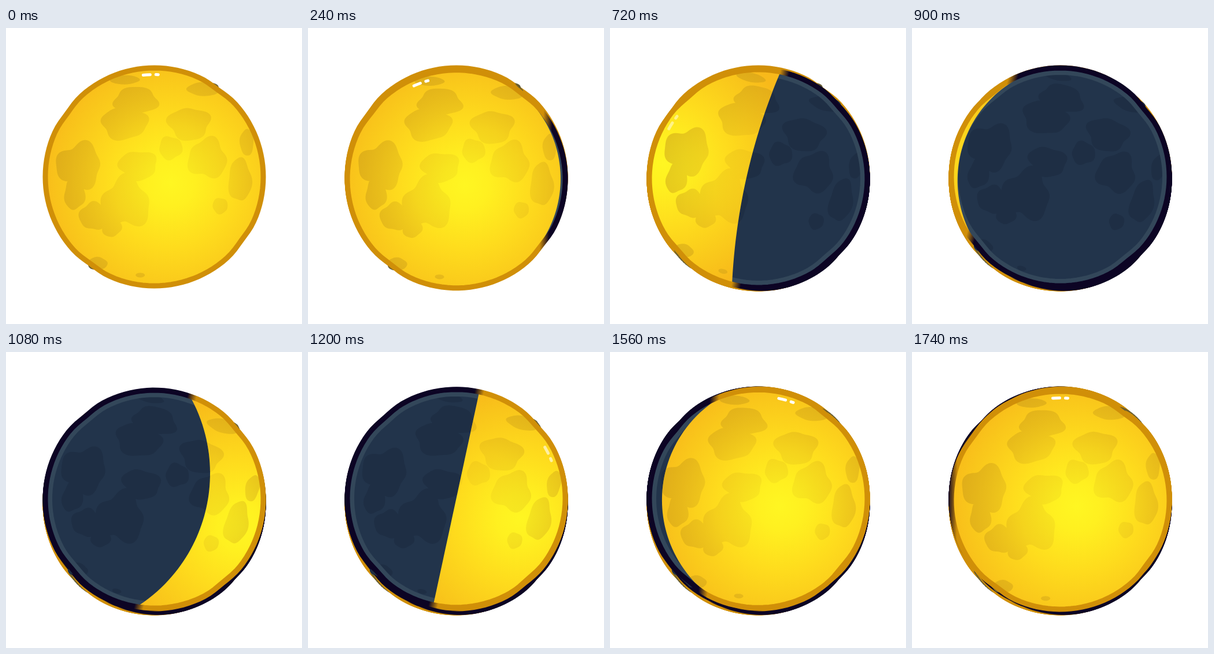
Recreate the animation shown at these times as an HTML page with a canvas. Size 512 by 512 pixels, loop 1.8 s.

```html
<!DOCTYPE html>
<html>
<head>
<meta charset="utf-8">
<title>Moon phases</title>
<style>
html, body { margin: 0; width: 100%; height: 100%; overflow: hidden; background: #fff; }
canvas { display: block; width: 512px; height: 512px; }
</style>
</head>
<body>
<canvas id="moon" width="512" height="512"></canvas>
<script>
const ctx = document.getElementById('moon').getContext('2d');
const LOOP = 1800, STEP = 60, CX = 256.5, CY = 257.5, R = 185, EDGE = 195;
const TAU = Math.PI * 2, rad = d => d * Math.PI / 180;
const clamp = (v, lo, hi) => Math.min(hi, Math.max(lo, v));

// Adds a closed ring whose radius varies with the angle
function ring(path, x, y, rx, ry, shape) {
  for (let d = 0; d < 360; d += 3) {
    const a = rad(d), q = shape(a);
    const point = [x + rx * q * Math.cos(a), y + ry * q * Math.sin(a)];
    d ? path.lineTo(...point) : path.moveTo(...point);
  }
  path.closePath();
  return path;
}

// Four shallow dents around the outline
const dented = a => 1 - .011 * Math.max(0, Math.cos(4 * (a - rad(36)))) ** 8;
const disc = r => ring(new Path2D(), 0, 0, r, r, dented);
const body = disc(R), rim = disc(188.5), shine = disc(180.5);

// Lobes of the seas and craters: x, y, half width, half height
const lobes = [
  [-32, -132, 38, 23], [-52, -92, 40, 27], [-130, -20, 38, 38], [-138, 30, 18, 27],
  [60, -92, 36, 28], [92, -32, 33, 34], [28, -50, 20, 20], [160, -60, 12, 23],
  [148, 5, 20, 37], [114, 50, 13, 14], [-106, 68, 23, 24], [-74, 86, 17, 18],
  [-28, -20, 33, 25], [-50, 45, 42, 42], [-52, -168, 26, 8], [85, -152, 28, 12],
  [-98, 150, 17, 11], [-24, 170, 8, 4]
];
const spots = new Path2D();
lobes.forEach(([x, y, rx, ry], i) => {
  const wobble = Math.min(rx, ry) / 300;
  ring(spots, x, y, rx, ry, a =>
    1 + wobble * (Math.sin(3 * a + i * 2.4) + .7 * Math.sin(5 * a + i * 4.1)));
});

function radial(x, y, r, stops) {
  const paint = ctx.createRadialGradient(x, y, 0, x, y, r);
  for (const at in stops) paint.addColorStop(+at, stops[at]);
  return paint;
}

// Position of the shadow edge: apex on the axis, chord at the poles
function phase(t) {
  const waning = t < 940;
  const raw = waning
    ? EDGE - 372 * (t / 900) ** 2.45
    : -EDGE + EDGE * ((LOOP - t) / 600) ** 2.1;
  const apex = clamp(raw, -EDGE, EDGE);
  const chord = apex * (.21 + .79 * (Math.abs(apex) / EDGE) ** 6);
  return { waning, apex, chord };
}

function litArea({ waning, apex, chord }) {
  const half = Math.sqrt(Math.max(0, R * R - chord * chord));
  const sag = apex - chord || .001;
  const bend = (half * half + sag * sag) / (2 * sag);
  const side = waning ? -300 : 300;
  const path = new Path2D();
  path.moveTo(side, -300);
  path.lineTo(chord, -300);
  for (let k = -24; k <= 24; k++) {
    const y = half * k / 24;
    const x = apex - bend + Math.sign(sag) * Math.sqrt(Math.max(0, bend * bend - y * y));
    path.lineTo(x, y);
  }
  path.lineTo(chord, 300);
  path.lineTo(side, 300);
  return path;
}

function drawNight() {
  ctx.fillStyle = '#22344b';
  ctx.fill(body);
  ctx.fillStyle = '#1e2e44';
  ctx.fill(spots);
  ctx.strokeStyle = '#33475a';
  ctx.lineWidth = 8;
  ctx.stroke(shine);
}

function drawDay({ waning, apex }) {
  const x = waning ? 28 - (EDGE - apex) * .9 : 28 + (apex + EDGE) * .45;
  ctx.fillStyle = radial(x, 10, 230, {
    0: '#fff622', .18: '#fff020', .5: '#fedb1d', .82: '#f9c61b', 1: '#f8b91a'
  });
  ctx.fill(body);
  // Seas look stronger away from the middle
  ctx.fillStyle = radial(28, 10, 200, {
    0: 'rgba(200,155,24,.08)', .5: 'rgba(200,155,24,.18)', 1: 'rgba(200,155,24,.5)'
  });
  ctx.fill(spots);
}

function drawRim({ waning, apex, chord }) {
  const split = chord + (waning ? 10 + apex * .1 : 0);
  const paint = ctx.createLinearGradient(split - 8, 0, split + 8, 0);
  paint.addColorStop(waning ? 0 : 1, '#d08f08');
  paint.addColorStop(waning ? 1 : 0, '#0c0424');
  ctx.strokeStyle = paint;
  ctx.lineWidth = 9;
  ctx.stroke(rim);
}

function drawGlint(t, { waning, apex }) {
  const d = 1740 - t;
  const angle = rad(waning ? -92 - .076 * t : -90 + .0719 * d + 8.7e-5 * d * d);
  ctx.globalAlpha = clamp(((waning ? apex : -apex) + 90) / 150, 0, 1);
  ctx.strokeStyle = '#fff';
  ctx.lineWidth = 5;
  ctx.lineCap = 'round';
  for (const [from, to] of [[-13, -1], [9, 13]]) {
    ctx.beginPath();
    ctx.arc(0, 0, 177, angle + from / 177, angle + to / 177);
    ctx.stroke();
  }
  ctx.globalAlpha = 1;
}

function drawMoon(t) {
  const turn = TAU * t / LOOP, now = phase(t);
  const tilt = rad(7.5 * (1 - Math.cos(turn - .15)));
  ctx.save();
  ctx.translate(CX, CY + 5 * Math.sin(turn));
  ctx.rotate(tilt);
  drawNight();
  ctx.save();
  ctx.clip(litArea(now));
  drawDay(now);
  ctx.rotate(-tilt);
  drawGlint(t, now);
  ctx.restore();
  drawRim(now);
  ctx.restore();
}

// Earlier poses stay underneath, so the bobbing leaves thin slivers at the rim
let shown = -1;
function tick() {
  const step = Math.floor(performance.now() % LOOP / STEP);
  if (step !== shown) {
    shown = step;
    ctx.fillStyle = '#fff';
    ctx.fillRect(0, 0, 512, 512);
    for (let i = 0; i <= step; i++) drawMoon(i * STEP);
  }
  requestAnimationFrame(tick);
}
tick();
</script>
</body>
</html>
```
